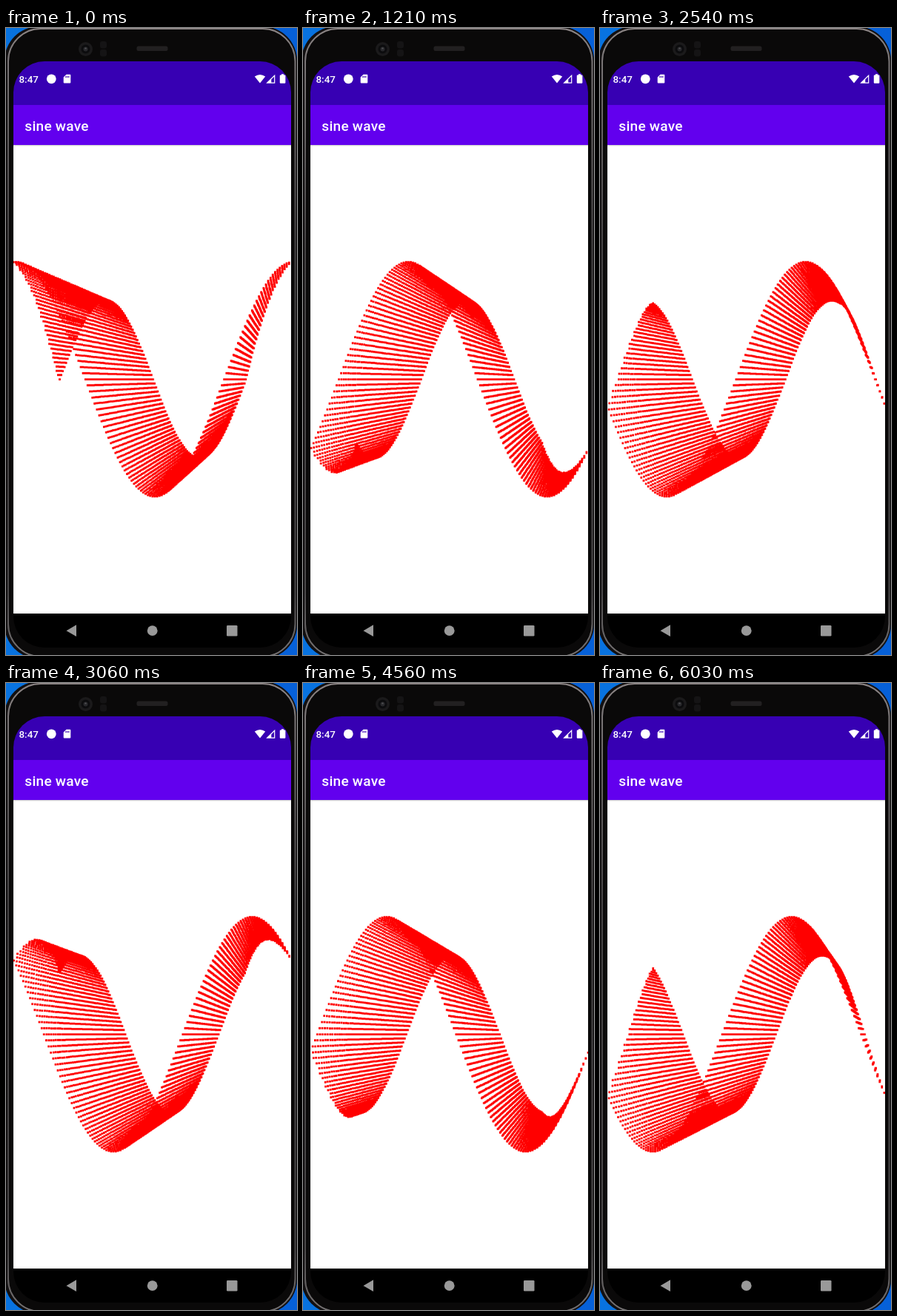
An HTML page with a canvas that plays this animation: 393x847 px, repeating every 6120 ms.

```html
<!DOCTYPE html>
<html lang="en">
<head>
<meta charset="utf-8">
<title>sine wave</title>
<style>
  html, body { margin: 0; width: 100%; height: 100%; overflow: hidden; background: linear-gradient(90deg, #0873e0, #0660d8); }
  svg, canvas { position: absolute; display: block; }
  svg { left: 0; top: 0; }
  canvas { left: 10px; top: 158px; mix-blend-mode: multiply; }
  text { font-family: Roboto, "Open Sans", sans-serif; font-weight: 500; fill: #fff; }
</style>
</head>
<body>
<svg width="393" height="847" viewBox="0 0 393 847">
  <defs>
    <linearGradient id="rim" x1="0" y1="0" x2="0" y2="1">
      <stop offset="0" stop-color="#8b8484"/>
      <stop offset=".06" stop-color="#777374"/>
      <stop offset=".35" stop-color="#454344"/>
      <stop offset=".9" stop-color="#4a4849"/>
      <stop offset="1" stop-color="#777475"/>
    </linearGradient>
    <linearGradient id="shade" x1="0" y1="0" x2="0" y2="1">
      <stop offset="0" stop-color="#000" stop-opacity=".22"/>
      <stop offset="1" stop-color="#000" stop-opacity="0"/>
    </linearGradient>
    <clipPath id="screen"><rect x="10" y="45" width="375" height="792" rx="42"/></clipPath>
  </defs>

  <!-- phone body -->
  <rect x="-2" y="-2" width="395" height="854" rx="46" fill="#121011"/>
  <rect x="3" y="1" width="387.500" height="848" rx="44" fill="#0a0909" stroke="url(#rim)" stroke-width="2"/>
  <circle cx="107.5" cy="28.5" r="9.5" fill="#1b1a1b"/>
  <circle cx="107.5" cy="28.5" r="6" fill="#0c0c0e"/>
  <circle cx="107.5" cy="28.5" r="3" fill="#29292c"/>
  <circle cx="107.5" cy="27.5" r="1.1" fill="#56565a"/>
  <rect x="127" y="18" width="9" height="9.5" rx="3" fill="#151415"/>
  <rect x="127" y="29" width="9" height="9.5" rx="3" fill="#151415"/>
  <rect x="176.500" y="24.500" width="42" height="6.500" rx="2.500" fill="#222021"/>

  <!-- screen -->
  <g clip-path="url(#screen)">
    <rect x="10" y="45" width="375" height="59" fill="#3700b3"/>
    <rect x="10" y="104" width="375" height="54" fill="#6200ee"/>
    <rect x="10" y="158" width="375" height="633" fill="#fff"/>
    <rect x="10" y="158" width="375" height="2" fill="url(#shade)"/>
    <rect x="10" y="791" width="375" height="46" fill="#000"/>
  </g>

  <!-- status bar -->
  <text x="17.500" y="73.600" font-size="13.400">8:47</text>
  <g fill="#fff">
    <circle cx="61.300" cy="68.800" r="6.400"/>
    <path d="M81.500 62.800H86.300Q87.300 62.800 87.300 63.800V73.600Q87.300 74.600 86.300 74.600H78.700Q77.700 74.600 77.700 73.600V66.600Z"/>
    <path d="M335.800 65.500Q343 60.500 350.200 65.500L343 74.600Z"/>
    <path d="M363.300 62.800V74.700H351.200ZM362.100 65.700L358.300 69.500V73.500H362.100Z" fill-rule="evenodd"/>
    <path d="M372 63.400V62.200H375.200V63.400H376.400Q377.400 63.400 377.400 64.400V73.700Q377.400 74.700 376.400 74.700H370.800Q369.800 74.700 369.800 73.700V64.400Q369.800 63.400 370.800 63.400Z"/>
  </g>
  <g fill="#3700b3">
    <rect x="80.300" y="64.900" width="1.100" height="2.200"/>
    <rect x="82.300" y="64.900" width="1.100" height="2.200"/>
    <rect x="84.300" y="64.900" width="1.100" height="2.200"/>
  </g>

  <text x="25.300" y="138.500" font-size="19.100" letter-spacing=".24">sine wave</text>

  <!-- navigation bar -->
  <g fill="#999">
    <path d="M81.500 814.200L95 806.300V822.100Z"/>
    <circle cx="197.700" cy="814.200" r="6.900"/>
    <rect x="298" y="807" width="14.500" height="14.500" rx="1.300"/>
  </g>
</svg>
<canvas id="view" width="375" height="633"></canvas>

<script>
  const LOOP = 6120;
  const W = 1080, H = 1823;        // device pixels of the drawing area
  const DOT = 8, AMP = H / 4;
  const STEP = 3, LAYERS = 50;     // degrees between dots, depth slices

  // [tick, start in ms]
  const CLOCK = [
    [0, 0], [1, 70], [9, 670], [10, 750], [16, 1210], [18, 1360], [19, 1440],
    [26, 1990], [27, 2060], [34, 2610], [35, 2690], [40, 3060], [43, 3290],
    [44, 3370], [47, 3620], [51, 3930], [52, 4000], [59, 4560], [60, 4640],
    [68, 5250], [69, 5330], [76, 5870], [77, 5950], [78, 6030]
  ];
  // [tick, phase of the front curve at the left edge, in degrees]
  const PHASE = [
    [0, 86.8], [16, -37], [27, -122], [40, -219.8], [47, -278.9], [59, -368.9], [78, -509]
  ];

  function lerp(keys, x) {
    let i = 1;
    while (i < keys.length - 1 && keys[i][0] < x) i++;
    const [x0, y0] = keys[i - 1], [x1, y1] = keys[i];
    return y0 + (y1 - y0) * (x - x0) / (x1 - x0);
  }

  const starts = Array.from({ length: 79 }, (_, i) => Math.round(lerp(CLOCK, i) / 10) * 10);

  const view = document.getElementById("view").getContext("2d");
  const sheet = document.createElement("canvas");
  sheet.width = W;
  sheet.height = H;
  const pen = sheet.getContext("2d");
  view.imageSmoothingQuality = "high";

  function drawWave(phase) {
    pen.fillStyle = "#fff";
    pen.fillRect(0, 0, W, H);
    pen.fillStyle = "#f00";
    for (let k = 0; k < LAYERS; k++) {
      const z = 1 + k / 100;
      const lag = 180 * (z - 1);
      for (let a = 0; a < 360; a += STEP) {
        const turn = (a - phase + lag) / 360;
        const u = turn - Math.floor(turn);
        const x = W / 2 + (u - 0.5) * W / z;
        const y = H / 2 - AMP * Math.sin(a * Math.PI / 180) / z;
        pen.fillRect(Math.round(x - DOT / 2), Math.round(y - DOT / 2), DOT, DOT);
      }
    }
    view.drawImage(sheet, 0, 0, 375, 633);
  }

  let shown = -1;
  const begin = performance.now();

  function tick() {
    const t = (performance.now() - begin) % LOOP;
    let n = starts.length - 1;
    while (starts[n] > t) n--;
    if (n !== shown) {
      shown = n;
      drawWave(lerp(PHASE, n));
    }
    requestAnimationFrame(tick);
  }
  tick();
</script>
</body>
</html>
```
